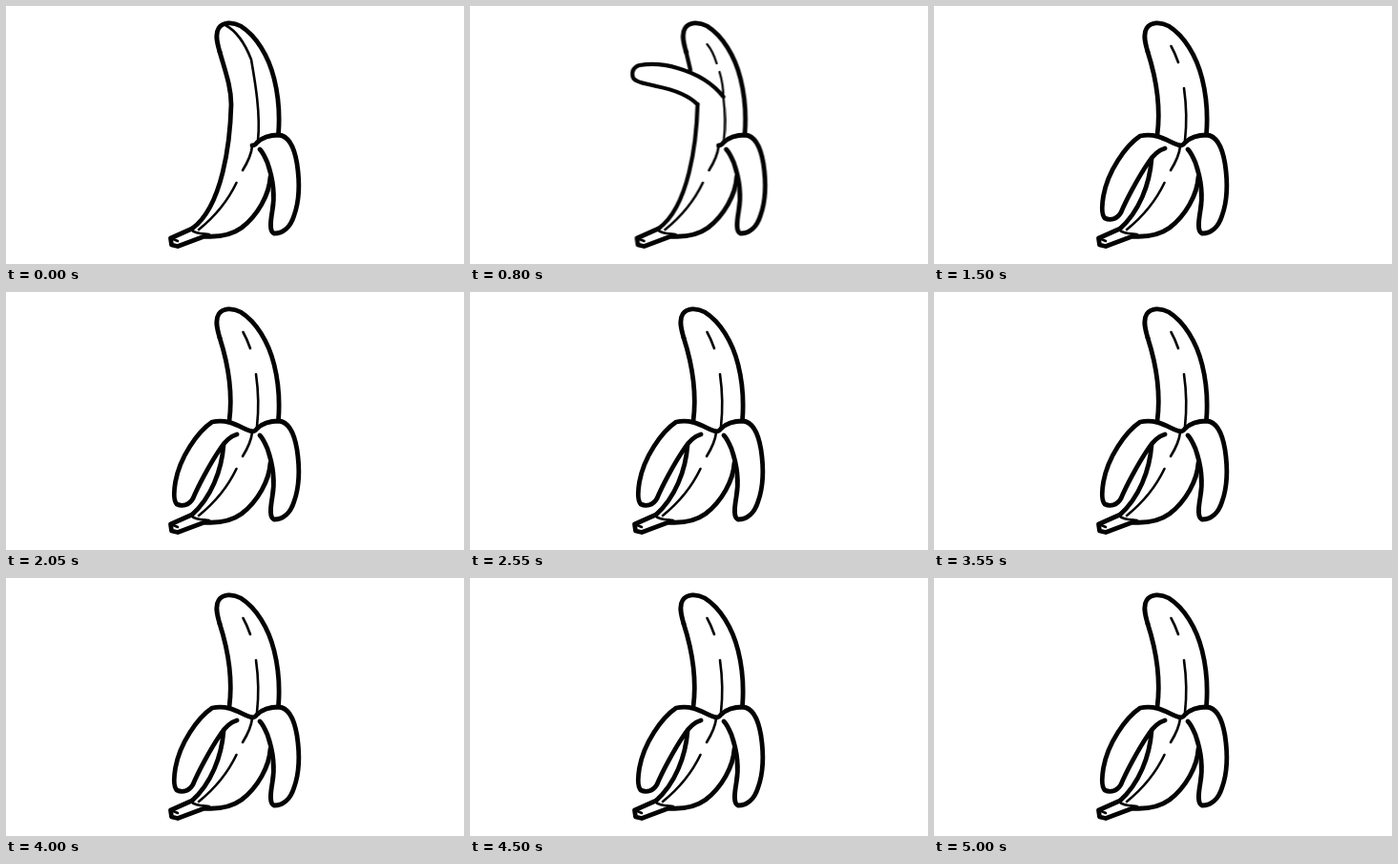
An HTML page for the animation above (5.05 s loop, 480x270 px).

```html
<!DOCTYPE html>
<html lang="en">
<head>
<meta charset="utf-8">
<title>Peeling banana</title>
<style>
  html, body { margin: 0; width: 100%; height: 100%; overflow: hidden; background: #fff; }
  svg { display: block; width: 100vw; height: 100vh; }
  path { fill: none; stroke: #040404; stroke-width: 4.8; stroke-linecap: round; stroke-linejoin: round; }
  .thin path, path.thin { stroke-width: 2.6; }
  .peel { fill: #fff; }
  .pose { animation: 5050ms step-end infinite; }
  .closed { animation-name: closed; }
  .half { animation-name: half; }
  .open { animation-name: open; }
  .half path { stroke-width: 4.3; }
  .half .thin path { stroke-width: 2.3; }
  .whole { animation: nudge 5050ms step-end infinite; }
  /* pose changes at 500 ms and 1000 ms */
  @keyframes closed { 0% { opacity: 1 } 9.901%, 100% { opacity: 0 } }
  @keyframes half { 0% { opacity: 0 } 9.901% { opacity: 1 } 19.802%, 100% { opacity: 0 } }
  @keyframes open { 0% { opacity: 0 } 19.802%, 100% { opacity: 1 } }
  @keyframes nudge { 0% { transform: none } 9.901% { transform: translate(2.5px, 0) } 19.802%, 100% { transform: none } }
</style>
</head>
<body>
<svg viewBox="0 0 480 270">
  <g class="whole">
    <!-- fruit tip and right side -->
    <path d="M224 48C221 38 219 29 223 23C227 17 237 16 246 21C262 31 275 52 281 76C286 96 287 115 285.500 134"/>
    <!-- lower right body and stem -->
    <path d="M277 179C276 197 264 219 247 232C236 240 222 242 208 241L180 251.500L173.500 250L172.500 243L195 233"/>
    <g class="thin">
      <path d="M194 234C197 238 204 238 213 239M173 243L180 246"/>
      <path d="M241.500 185C232 205 218 221 202 234"/>
      <path d="M258 147C257 156 253 164 248 172"/>
    </g>

    <g class="pose closed">
      <path d="M224 48C230 69 236 85 236 103C235 142 227 210 195 233"/>
      <path class="thin" d="M230 20C241 26 250 38 257 56C261 79 267 113 264 141"/>
    </g>

    <g class="pose half">
      <path d="M224 48L228.500 67"/>
      <g class="thin">
        <path d="M246 40Q252 47 256 60M259 69Q263 82 263 95C265 112 265 128 263.500 141"/>
      </g>
      <path class="peel" d="M263 95C252 81 236 71 215 65C202 61 187 60 175 62C168 64 166 71 169 76C173 81 183 81 193 84C208 87 226 93 236 103"/>
      <path d="M236 103C235 142 227 210 195 233"/>
    </g>

    <g class="pose open">
      <path d="M224 48C233 76 238 104 234 135"/>
      <path class="thin" d="M248.500 42Q252.500 49 256 59M262 86Q266 114 263 141"/>
      <path d="M228 160C226 187 215 215 195 233"/>
      <path class="peel" d="M258 146C247 144 237 132 216 136C201 146 182 173 177.500 199C175.500 211 176 219 179 222C185 225 192 223 196 216C201 204 213 181 224.500 164C229 157 235 151 242 149"/>
    </g>

    <path class="peel" d="M258 146Q261 146 263 143C268 138 277 135 286 135C296 136 302 147 305 165C308 185 307 205 302 219C298 232 290 238 281 238C276 236 277 227 279 215C282 199 280 181 274 164C271 157 269 153 266 150"/>
  </g>
</svg>
</body>
</html>
```
